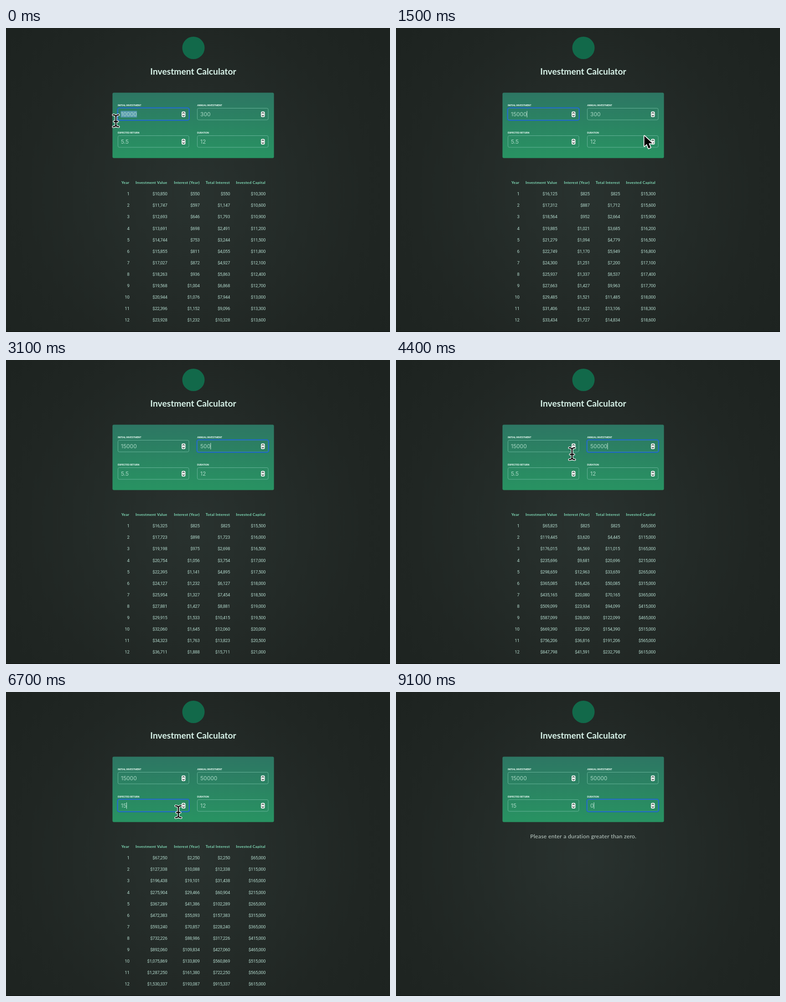
Write an HTML page with a canvas that moves like this. It is 842x665 px and loops after 9500 ms.

```html
<!DOCTYPE html>
<html lang="en">
<head>
<meta charset="utf-8">
<title>Investment Calculator</title>
<style>
  html, body { margin: 0; width: 100%; height: 100%; overflow: hidden; background: #1e2421; }
  canvas { display: block; }
</style>
</head>
<body>
<canvas id="stage" width="842" height="665"></canvas>
<script>
const ctx = document.getElementById('stage').getContext('2d');
const LOOP = 9500, STEP = 100;
const ROUND = 'Lato, sans-serif', SANS = 'Roboto, sans-serif';
const INPUT_FONT = '400 12px Inter, sans-serif';
const MINT = '#b5dccf';

const fields = [
  { label: 'INITIAL INVESTMENT', x: 245, y: 175, value: '10000' },
  { label: 'ANNUAL INVESTMENT', x: 419, y: 175, value: '300' },
  { label: 'EXPECTED RETURN', x: 245, y: 235, value: '5.5' },
  { label: 'DURATION', x: 419, y: 235, value: '12' }
];
const FIELD_W = 156.5, FIELD_H = 26.5;

const columns = [
  ['Year', 270.5], ['Investment Value', 353.5], ['Interest (Year)', 424.5],
  ['Total Interest', 491], ['Invested Capital', 569]
];

// time, focused field, its text, whether the text is selected
const edits = [
  [0, 0, '10000', true],
  [400, 0, '1'], [500, 0, '15'], [700, 0, '150'], [800, 0, '1500'], [900, 0, '15000'],
  [2100, 1, '300'], [2200, 1, '300', true],
  [2900, 1, '5'], [3000, 1, '50'], [3100, 1, '500'], [3300, 1, '5000'], [3600, 1, '50000'],
  [5000, 2, '5.5'], [5100, 2, '5.5', true],
  [5800, 2, '1'], [5900, 2, '15'],
  [7100, 3, '12'], [7300, 3, '12', true],
  [8500, 3, '0']
];

// pointer stretches: each is a list of time, x, y; the pointer is hidden between them
const moves = [
  [[0, 241, 203], [400, 241, 203]],
  [[1100, 245, 205], [1500, 543, 235], [2000, 571, 204], [2100, 566, 205], [2300, 380, 205], [2900, 380, 205]],
  [[3800, 382, 206], [4200, 386, 205], [4400, 386, 205], [4800, 372, 267], [5000, 372, 267],
   [5200, 205, 265], [5800, 205, 265]],
  [[6200, 252, 262], [7100, 468, 262], [7500, 471, 263], [8500, 471, 263]]
];
const drags = [[0, 400], [2100, 2900], [5000, 5800]];

function text(str, x, y, font, color, align = 'left', spacing = 0) {
  ctx.font = font;
  ctx.fillStyle = color;
  ctx.textAlign = align;
  ctx.letterSpacing = spacing + 'px';
  ctx.fillText(str, x, y);
}

function box(x, y, w, h, r) {
  ctx.beginPath();
  ctx.roundRect(x, y, w, h, r);
}

function stroke(color, width, path) {
  ctx.strokeStyle = color;
  ctx.lineWidth = width;
  path ? ctx.stroke(path) : ctx.stroke();
}

function drawPage() {
  const glow = ctx.createRadialGradient(411, 360, 0, 411, 360, 534);
  glow.addColorStop(0, '#29322f');
  glow.addColorStop(0.7, '#202623');
  glow.addColorStop(1, '#1d2320');
  ctx.fillStyle = glow;
  ctx.fillRect(0, 0, 842, 665);
  ctx.fillStyle = '#0e110f';
  ctx.fillRect(0, 664, 842, 1);

  ctx.fillStyle = '#12694a';
  ctx.beginPath();
  ctx.arc(411, 43.5, 24.5, 0, 7);
  ctx.fill();
  text('Investment Calculator', 410.5, 102, '700 19.3px ' + ROUND, '#d8f3e9', 'center');

  const panel = ctx.createLinearGradient(0, 141, 0, 285);
  panel.addColorStop(0, '#2d7663');
  panel.addColorStop(1, '#289362');
  ctx.fillStyle = panel;
  box(233.5, 141.5, 354, 143, 3);
  ctx.fill();
}

function drawField({ label, x, y, value }, focused, selected, caret) {
  text(label, x, y - 4.5, '700 5.7px ' + SANS, '#dcf2ea', 'left', -0.25);

  box(x + 0.5, y + 0.5, FIELD_W - 1, FIELD_H - 1, 3);
  stroke(focused ? '#4b93b8' : '#65b398', 1);
  if (focused) {
    box(x - 0.5, y - 0.5, FIELD_W + 1, FIELD_H + 1, 4);
    stroke('#1c66c4', 2);
  }

  ctx.font = INPUT_FONT;
  ctx.letterSpacing = '0px';
  const width = ctx.measureText(value).width;
  if (focused && selected) {
    ctx.fillStyle = '#5a9bb2';
    ctx.fillRect(x + 6.5, y + 6.5, width + 0.5, 14);
  }
  text(value, x + 7, y + 17.8, INPUT_FONT, '#a9d8c5');
  if (focused && !selected) {
    ctx.globalAlpha = caret;
    ctx.fillStyle = '#d5f0e6';
    ctx.fillRect(x + 7 + width, y + 6.5, 1, 14);
    ctx.globalAlpha = 1;
  }

  // stepper
  ctx.fillStyle = '#eef3f1';
  box(x + 140, y + 7.5, 8.5, 12.5, 3);
  ctx.fill();
  const cx = x + 144.25, cy = y + 13.75;
  ctx.beginPath();
  for (const s of [-1, 1]) {
    ctx.moveTo(cx - 2.4, cy + s * 1.7);
    ctx.lineTo(cx, cy + s * 3.9);
    ctx.lineTo(cx + 2.4, cy + s * 1.7);
  }
  stroke('#26332e', 1.2);
}

function drawTable(initial, annual, rate, years) {
  for (const [name, right] of columns)
    text(name, right, 341, '700 8.4px ' + ROUND, '#83e0bb', 'right', 0.3);

  const money = n => '$' + Math.round(n).toLocaleString('en-US');
  let value = initial;
  for (let year = 1; year <= years; year++) {
    const interest = value * rate / 100;
    value += interest + annual;
    const invested = initial + annual * year;
    const cells = [year, money(value), money(interest), money(value - invested), money(invested)];
    const y = 366.3 + (year - 1) * 25.07;
    cells.forEach((cell, i) => text(cell, columns[i][1], y, '400 9.6px ' + SANS, MINT, 'right', -0.3));
  }
}

const beam = new Path2D('M-6-13Q0-13 0-8.5V8.5Q0 13-6 13M6-13Q0-13 0-8.5M0 8.5Q0 13 6 13M-4 1.5H4');
const arrow = new Path2D('M1.5 3V25.5L6.8 20.8 10.8 30.3 15 28.5 11.2 19.3H19Z');

function pointerAt(t) {
  const path = moves.find(m => t >= m[0][0] && t < m[m.length - 1][0]);
  if (!path) return null;
  const i = path.findIndex(p => p[0] > t);
  const [t0, x0, y0] = path[i - 1], [t1, x1, y1] = path[i];
  const u = (t - t0) / (t1 - t0), k = u * u * (3 - 2 * u);
  return { x: x0 + (x1 - x0) * k, y: y0 + (y1 - y0) * k };
}

function drawPointer(t) {
  const p = pointerAt(t);
  if (!p) return;
  const tipY = p.y - 6;
  const overField = fields.some(f =>
    p.x > f.x && p.x < f.x + FIELD_W && tipY > f.y && tipY < f.y + FIELD_H);
  const dragging = drags.some(([a, b]) => t >= a && t < b);
  ctx.save();
  ctx.lineJoin = ctx.lineCap = 'round';
  if (overField || dragging) {
    ctx.translate(p.x, p.y);
    stroke('#fff', 5, beam);
    stroke('#000', 2.4, beam);
  } else {
    ctx.translate(p.x, p.y - 2);
    stroke('#fff', 3.4, arrow);
    ctx.fillStyle = '#000';
    ctx.fill(arrow);
  }
  ctx.restore();
}

// solid, then a short fade out and back in, every 600 ms
function caretAlpha(age) {
  const phase = age % 600;
  return phase < 300 ? 1 : Math.min(1, Math.abs(phase - 450) / 150);
}

function draw(t) {
  const values = fields.map(f => f.value);
  let current;
  for (const edit of edits) {
    if (edit[0] > t) break;
    current = edit;
    values[edit[1]] = edit[2];
  }
  const [since, focus, , selected] = current;

  drawPage();
  fields.forEach((f, i) =>
    drawField({ ...f, value: values[i] }, i === focus, selected, caretAlpha(t - since)));

  const numbers = values.map(Number);
  if (numbers[3] > 0) drawTable(...numbers);
  else text('Please enter a duration greater than zero.', 410.8, 320.3,
    '400 12.3px ' + ROUND, '#c3d2cc', 'center', 0.25);

  drawPointer(t);
}

const start = performance.now();
function tick() {
  const t = (performance.now() - start) % LOOP;
  draw(Math.floor(t / STEP) * STEP);
  requestAnimationFrame(tick);
}
tick();
</script>
</body>
</html>
```
